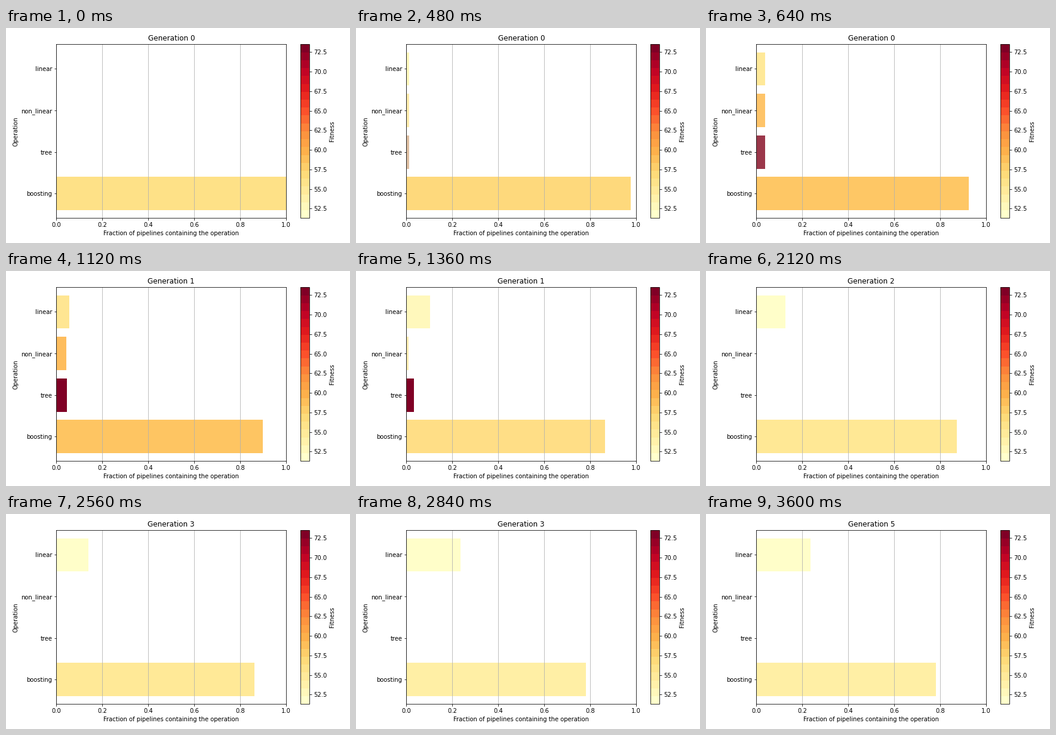
Recreate the animation shown at these times as a matplotlib script. Size 576 px wide and 360 px high, loop 4.32 s.

```python
import matplotlib.pyplot as plt
import numpy as np
from matplotlib.animation import FuncAnimation
from matplotlib.cm import ScalarMappable
from matplotlib.colors import Normalize

WIDTH, HEIGHT, DPI = 576, 360, 72
STEPS_PER_GENERATION = 18
INTERVAL_MS = 40
EASING_POWER = 4

OPERATIONS = ["linear", "non_linear", "tree", "boosting"]

# One row per generation, one column per operation.
FRACTIONS = np.array([
    [0, 0, 0, 1],
    [1 / 21, 1 / 21, 1 / 21, 19 / 21],
    [4 / 34, 0, 1 / 34, 29 / 34],
    [7 / 55, 0, 0, 48 / 55],
    [13 / 55, 0, 0, 43 / 55],
    [13 / 55, 0, 0, 43 / 55],
])

# Fitness scaled to 0..1; operations that are absent take the lowest value.
FITNESS = np.array([
    [0, 0, 0, 0.20],
    [0.19, 0.37, 1, 0.33],
    [0.01, 0, 1, 0.17],
    [0.01, 0, 0, 0.16],
    [0.01, 0, 0, 0.11],
    [0.01, 0, 0, 0.11],
])

cmap = plt.get_cmap("YlOrRd")
COLORS = cmap(FITNESS)


def pixel_axes(fig, left, top, right, bottom):
    return fig.add_axes([left / WIDTH, 1 - bottom / HEIGHT,
                         (right - left) / WIDTH, (bottom - top) / HEIGHT])


def blend(rows, generation, weight):
    following = min(generation + 1, len(rows) - 1)
    return rows[generation] * (1 - weight) + rows[following] * weight


plt.rcParams["font.family"] = "DejaVu Sans"
fig = plt.figure(figsize=(WIDTH / DPI, HEIGHT / DPI), dpi=DPI, facecolor="w")
ax = pixel_axes(fig, 84.4, 27.4, 469.2, 318.4)
bars = ax.barh(OPERATIONS, FRACTIONS[0], color=COLORS[0])
ax.set_xlim(0, 1)
ax.set_xlabel("Fraction of pipelines containing the operation")
ax.set_ylabel("Operation")
ax.xaxis.grid(True)
ax.invert_yaxis()
title = ax.set_title("Generation 0")

scale = ScalarMappable(Normalize(51.28, 73.5), cmap.resampled(22))
scale.set_array([])
fig.colorbar(scale, cax=pixel_axes(fig, 493.4, 27.4, 508.1, 318.4),
             label="Fitness", ticks=np.arange(52.5, 73, 2.5))


def animate(frame):
    generation, step = divmod(frame, STEPS_PER_GENERATION)
    weight = (step / (STEPS_PER_GENERATION - 1)) ** EASING_POWER
    widths = blend(FRACTIONS, generation, weight)
    colors = blend(COLORS, generation, weight)
    for bar, width, color in zip(bars, widths, colors):
        bar.set_width(width)
        bar.set_facecolor(color)
    title.set_text(f"Generation {generation}")
    return [*bars, title]


animation = FuncAnimation(fig, animate,
                          frames=len(FRACTIONS) * STEPS_PER_GENERATION,
                          interval=INTERVAL_MS, repeat=True, repeat_delay=0)
plt.show()
```
